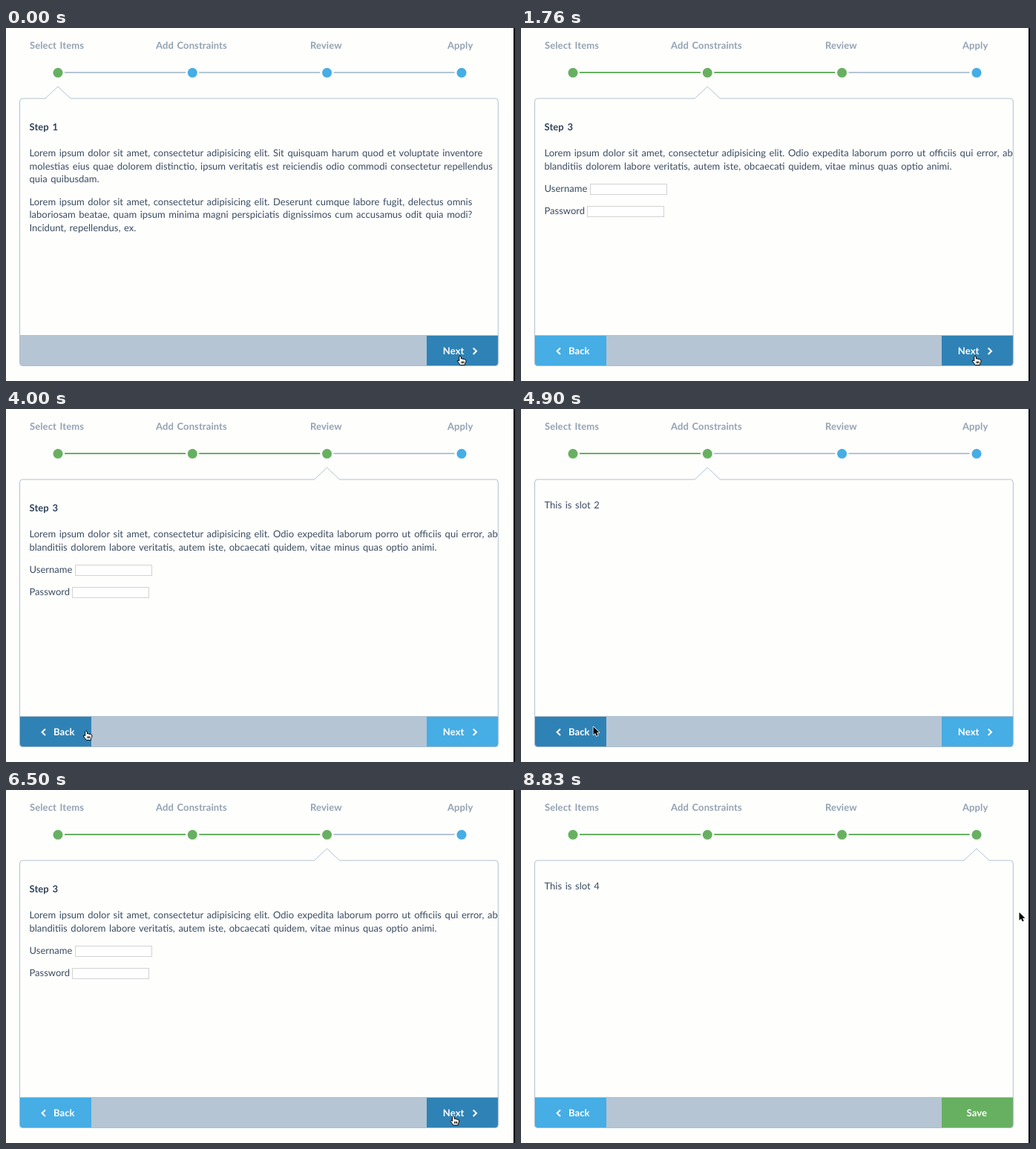
An HTML page with a canvas for the animation above (9.1 s loop, 686 by 476 pixels).

```html
<!DOCTYPE html>
<html lang="en">
<head>
<meta charset="utf-8">
<title>Step wizard</title>
<style>
html, body { margin: 0; width: 100%; height: 100%; overflow: hidden; background: #fefefd; }
canvas { display: block; width: 686px; height: 476px; }
</style>
</head>
<body>
<canvas id="stage"></canvas>
<script>
const W = 686, H = 476, LOOP = 9100;
const canvas = document.getElementById('stage');
const ratio = window.devicePixelRatio || 1;
canvas.width = W * ratio;
canvas.height = H * ratio;
const ctx = canvas.getContext('2d');

const GREEN = '#67b061', BLUE = '#46ade5', DARK = '#2f82b5', GREY = '#b5c5d4';
const EDGE = '#a9bbca', INK = '#2e4257', BODY = '#3a4c61', LABEL = '#93a2b2', PAPER = '#fefefd';

const TOP = 95;
const DOTS = [70, 251.3, 432.6, 614];
const LABELS = [['Select Items', 32], ['Add Constraints', 202], ['Review', 410], ['Apply', 595]];

// time of each click and the step it leads to
const CLICKS = [[0, 0], [630, 1], [1760, 2], [4300, 1], [6160, 2], [6900, 3]];

// cursor moves: start, end, from, control point, to
const MOVES = [
  [3000, 3400, [612, 441.5], [430, 374], [216.5, 460.5]],
  [3630, 4090, [216.5, 460.5], [150, 452], [97.5, 429]],
  [4900, 5550, [97.5, 428.5], [350, 428], [602.7, 439]],
  [8730, 8830, [602.7, 439], [640, 300], [671.5, 165]]
];

const PAGES = [
  () => {
    heading('Step 1');
    lines(173, [
      'Lorem ipsum dolor sit amet, consectetur adipisicing elit. Sit quisquam harum quod et voluptate inventore',
      'molestias eius quae dolorem distinctio, ipsum veritatis est reiciendis odio commodi consectetur repellendus',
      'quia quibusdam.'
    ]);
    lines(238.7, [
      'Lorem ipsum dolor sit amet, consectetur adipisicing elit. Deserunt cumque labore fugit, delectus omnis',
      'laboriosam beatae, quam ipsum minima magni perspiciatis dignissimos cum accusamus odit quia modi?',
      'Incidunt, repellendus, ex.'
    ]);
  },
  () => lines(134, ['This is slot 2']),
  () => {
    heading('Step 3');
    lines(173, [
      'Lorem ipsum dolor sit amet, consectetur adipisicing elit. Odio expedita laborum porro ut officiis qui error, ab',
      'blanditiis dolorem labore veritatis, autem iste, obcaecati quidem, vitae minus quas optio animi.'
    ]);
    field('Username', 93, 210);
    field('Password', 89, 240);
  },
  () => lines(134, ['This is slot 4'])
];

function text(str, x, y, color, bold) {
  ctx.font = (bold ? '700 ' : '400 ') + '13px Lato, "Open Sans", sans-serif';
  ctx.textRendering = 'geometricPrecision';
  ctx.fontKerning = 'normal';
  ctx.wordSpacing = '1.3px';
  ctx.letterSpacing = bold ? '0.1px' : '0px';
  ctx.fillStyle = color;
  ctx.fillText(str, x, y);
}

function heading(str) { text(str, 31.5, 138, INK, true); }

function lines(y, rows) {
  rows.forEach((row, i) => text(row, 31.5, y + i * 17.5, BODY));
}

function field(name, x, y) {
  text(name, 31.5, y + 11, BODY);
  ctx.fillStyle = '#fff';
  ctx.fillRect(x, y, 104, 15);
  ctx.lineWidth = 1;
  ctx.strokeStyle = '#d3d3d3';
  ctx.strokeRect(x + 0.5, y + 0.5, 103, 14);
}

function path(points, close) {
  ctx.beginPath();
  points.forEach(([x, y]) => ctx.lineTo(x, y));
  if (close) ctx.closePath();
}

function bezier(a, b, u) {
  return 3 * a * u * (1 - u) * (1 - u) + 3 * b * u * u * (1 - u) + u * u * u;
}

// CSS "ease"
function ease(x) {
  if (x <= 0) return 0;
  if (x >= 1) return 1;
  let lo = 0, hi = 1;
  for (let i = 0; i < 20; i++) {
    const mid = (lo + hi) / 2;
    if (bezier(0.25, 0.25, mid) < x) lo = mid; else hi = mid;
  }
  return bezier(0.1, 1, lo);
}

function wizardAt(t) {
  let step = 0, x = DOTS[0];
  for (const [at, next] of CLICKS) {
    if (t < at) break;
    x = DOTS[step] + (DOTS[next] - DOTS[step]) * ease((t - at - 25) / 300);
    step = next;
  }
  return { step, x };
}

function cursorAt(t) {
  let pos = MOVES[0][2];
  for (const [t0, t1, a, c, b] of MOVES) {
    if (t < t0) break;
    const p = Math.min(1, (t - t0) / (t1 - t0));
    const u = p * p * (3 - 2 * p), v = 1 - u;
    pos = [0, 1].map(i => v * v * a[i] + 2 * u * v * c[i] + u * u * b[i]);
  }
  return pos;
}

function progress(step) {
  LABELS.forEach(([name, x]) => text(name, x, 27.5, LABEL, true));
  DOTS.forEach((x, i) => {
    if (i < 3) {
      ctx.fillStyle = i < step ? GREEN : GREY;
      ctx.fillRect(x + 9, 59, 163, 2);
    }
    ctx.fillStyle = i <= step ? GREEN : BLUE;
    ctx.beginPath();
    ctx.arc(x, 60.3, 6.5, 0, 7);
    ctx.fill();
  });
}

function chevron(x, dir) {
  path([[x - 2.2 * dir, 431.5], [x + 2.2 * dir, 435.8], [x - 2.2 * dir, 440]]);
  ctx.lineWidth = 2;
  ctx.strokeStyle = '#fff';
  ctx.stroke();
}

function panel(step, x, t) {
  const frame = new Path2D();
  frame.roundRect(18.5, TOP, 644.8, 455.5 - TOP, 4);

  ctx.save();
  ctx.clip(frame);
  ctx.fillStyle = GREY;
  ctx.fillRect(18, 415, 646, 41);
  if (step > 0) {
    ctx.fillStyle = t >= 3960 && t < 5060 ? DARK : BLUE;
    ctx.fillRect(18, 415, 97, 41);
  }
  const hover = t < 3460 || t >= 5430;
  ctx.fillStyle = step === 3 ? GREEN : hover ? DARK : BLUE;
  ctx.fillRect(567, 415, 97, 41);
  ctx.restore();

  ctx.lineWidth = 0.9;
  ctx.strokeStyle = EDGE;
  ctx.stroke(frame);
  path([[19, 414.5], [663, 414.5]]);
  ctx.stroke();

  // pointer above the panel, covering the border beneath it
  path([[x - 17, TOP + 1], [x - 17, TOP], [x, 79], [x + 17, TOP], [x + 17, TOP + 1]], true);
  ctx.fillStyle = PAPER;
  ctx.fill();
  path([[x - 17, TOP], [x, 79], [x + 17, TOP]]);
  ctx.stroke();

  if (step > 0) {
    chevron(50.8, -1);
    text('Back', 64, 440, '#fff', true);
  }
  if (step === 3) {
    text('Save', 600.5, 439.5, '#fff', true);
  } else {
    text('Next', 588.8, 440, '#fff', true);
    chevron(631.8, 1);
  }
}

function arrow() {
  ctx.scale(0.88, 0.88);
  path([[0, 0], [0, 12.2], [2.8, 9.6], [4.8, 14], [7, 13], [5.1, 8.8], [9, 8.8]], true);
  ctx.lineWidth = 1.8;
  ctx.strokeStyle = '#fff';
  ctx.stroke();
  ctx.fillStyle = '#000';
  ctx.fill();
}

function hand() {
  ctx.beginPath();
  ctx.moveTo(-1.2, 7.5);
  ctx.lineTo(-1.2, 1.4);
  ctx.quadraticCurveTo(0, -0.4, 1.2, 1.4);
  ctx.lineTo(1.6, 4.6);
  ctx.quadraticCurveTo(3, 3.7, 4, 5);
  ctx.quadraticCurveTo(5.4, 4.3, 6.2, 5.6);
  ctx.quadraticCurveTo(8, 5.2, 8, 7);
  ctx.quadraticCurveTo(8, 9.6, 6.7, 11);
  ctx.lineTo(6.5, 13);
  ctx.lineTo(0.2, 13);
  ctx.quadraticCurveTo(-1.5, 10.5, -3.8, 7.6);
  ctx.quadraticCurveTo(-3.6, 5.6, -1.2, 7.5);
  ctx.closePath();
  ctx.fillStyle = '#fff';
  ctx.fill();
  ctx.lineWidth = 1;
  ctx.strokeStyle = '#000';
  ctx.stroke();
  for (const x of [1.9, 3.5, 5.1]) {
    path([[x, 8], [x, 10.8]]);
    ctx.stroke();
  }
}

function cursor(t) {
  const [x, y] = cursorAt(t);
  const pointing = t < 3070 || (t >= 3960 && t < 4900) || (t >= 5430 && t < 8750);
  ctx.save();
  ctx.translate(x, y);
  ctx.lineJoin = 'round';
  if (pointing) hand(); else arrow();
  ctx.restore();
}

function draw(t) {
  ctx.setTransform(ratio, 0, 0, ratio, 0, 0);
  ctx.fillStyle = PAPER;
  ctx.fillRect(0, 0, W, H);
  const { step, x } = wizardAt(t);
  progress(step);
  panel(step, x, t);
  PAGES[step]();
  ctx.fillStyle = '#000';
  ctx.fillRect(684, 0, 2, H);
  cursor(t);
}

const start = performance.now();
function tick() {
  draw((performance.now() - start) % LOOP);
  requestAnimationFrame(tick);
}
tick();
</script>
</body>
</html>
```
